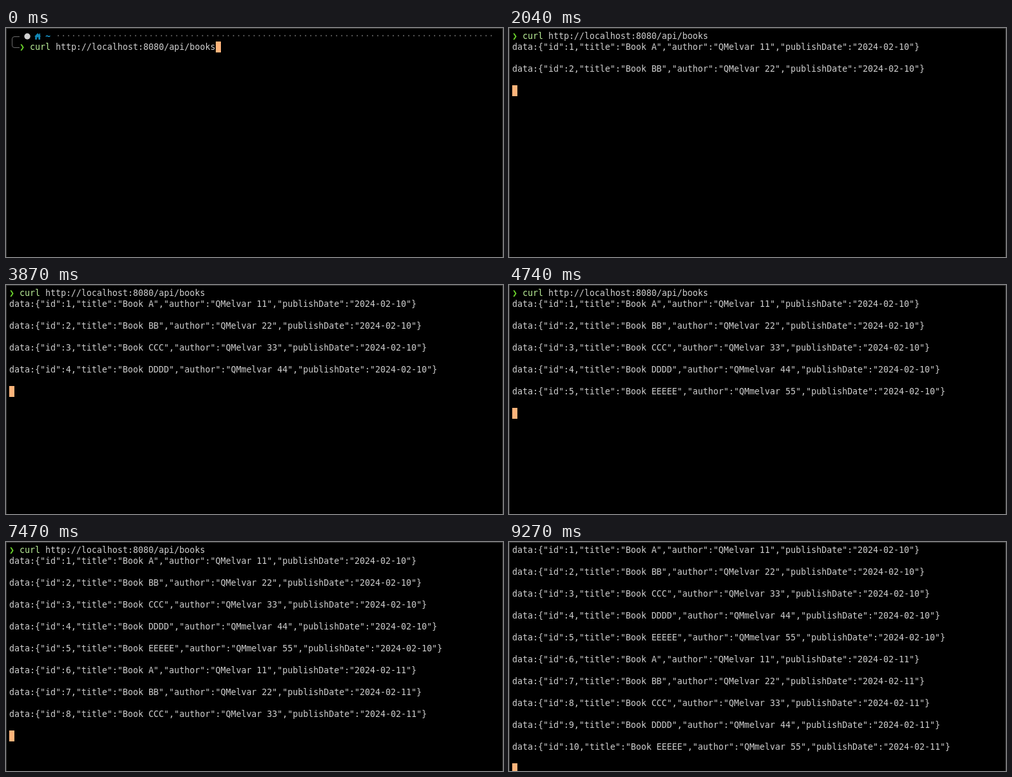
Recreate the animation shown at these times as an HTML page. Size 770 px wide and 356 px high, loop 9.54 s.

```html
<!DOCTYPE html>
<html lang="en">
<head>
<meta charset="utf-8">
<title>Streaming books with curl</title>
<style>
html, body { margin: 0; width: 770px; height: 356px; overflow: hidden; background: #000; }
#terminal {
  position: relative; box-sizing: border-box; width: 770px; height: 356px; overflow: hidden;
  border: solid #383838; border-width: 1px 1px 0;
}
pre {
  position: absolute; left: 4px; top: 3px; margin: 0; color: #cfcfcf;
  font: 13.289px/17px "DejaVu Sans Mono", monospace; font-variant-ligatures: none;
}
#cursor { position: absolute; width: 8px; height: 17px; background: #ffb47a; }
svg { position: absolute; left: -1px; top: -1px; }
.prompt { color: #6fdc2c; }
.command { color: #bdf29a; }
.path { color: #1a9fd8; font-weight: bold; }
.dots { color: #626262; }
</style>
</head>
<body>
<div id="terminal">
  <svg id="icons" width="80" height="40">
    <path d="M21 13.5H13Q9.5 13.5 9.5 17V27Q9.5 30.5 13 30.5H21" fill="none" stroke="#6a6a6a"/>
    <circle cx="33" cy="13" r="4.7" fill="#d0d0d0"/>
    <path d="M44 13.2L49 8L51.5 10.5V8.5H53V12L54.3 13.2H53V18H50.3V14.5H47.8V18H45.2V13.2Z" fill="#1287b5"/>
  </svg>
  <div id="cursor"></div>
  <pre id="screen"></pre>
</div>
<script>
const LOOP = 9540;
const ENTER = 30;
const ARRIVALS = [1140, 2040, 2940, 3870, 4740, 5640, 6570, 7470, 8370, 9270];
const MAX_ROWS = 21;

const [screen, cursor, icons] = ["screen", "cursor", "icons"].map(id => document.getElementById(id));
const span = (name, text) => `<span class="${name}">${text}</span>`;

const command = `${span("prompt", "❯")} ${span("command", "curl")} http://localhost:8080/api/books`;
const header = " ".repeat(7) + span("path", "~") + " " + span("dots", "·".repeat(85));

function book(i) {
  const n = i % 5;
  return "data:" + JSON.stringify({
    id: i + 1,
    title: "Book " + "ABCDE"[n].repeat(n + 1),
    author: (n < 3 ? "QMelvar " : "QMmelvar ") + 11 * (n + 1),
    publishDate: i < 5 ? "2024-02-10" : "2024-02-11"
  });
}

function show(lines, column, row) {
  const scroll = Math.max(0, row + 1 - MAX_ROWS);
  screen.innerHTML = lines.slice(scroll).join("\n");
  cursor.style.left = 4 + column * 8 + "px";
  cursor.style.top = 3 + (row - scroll) * 17 + "px";
}

let shown;
function draw(time) {
  const t = time % LOOP;
  const state = t < ENTER ? -1 : ARRIVALS.filter(a => a <= t).length;
  if (state !== shown) {
    shown = state;
    icons.style.display = state < 0 ? "" : "none";
    if (state < 0) {
      show([header, "  " + command], 40, 1);
    } else {
      const lines = [command];
      for (let i = 0; i < state; i++) lines.push(book(i), "");
      show(lines, 0, lines.length);
    }
  }
}

const start = performance.now();
function frame() {
  draw(performance.now() - start);
  requestAnimationFrame(frame);
}
frame();
</script>
</body>
</html>
```
